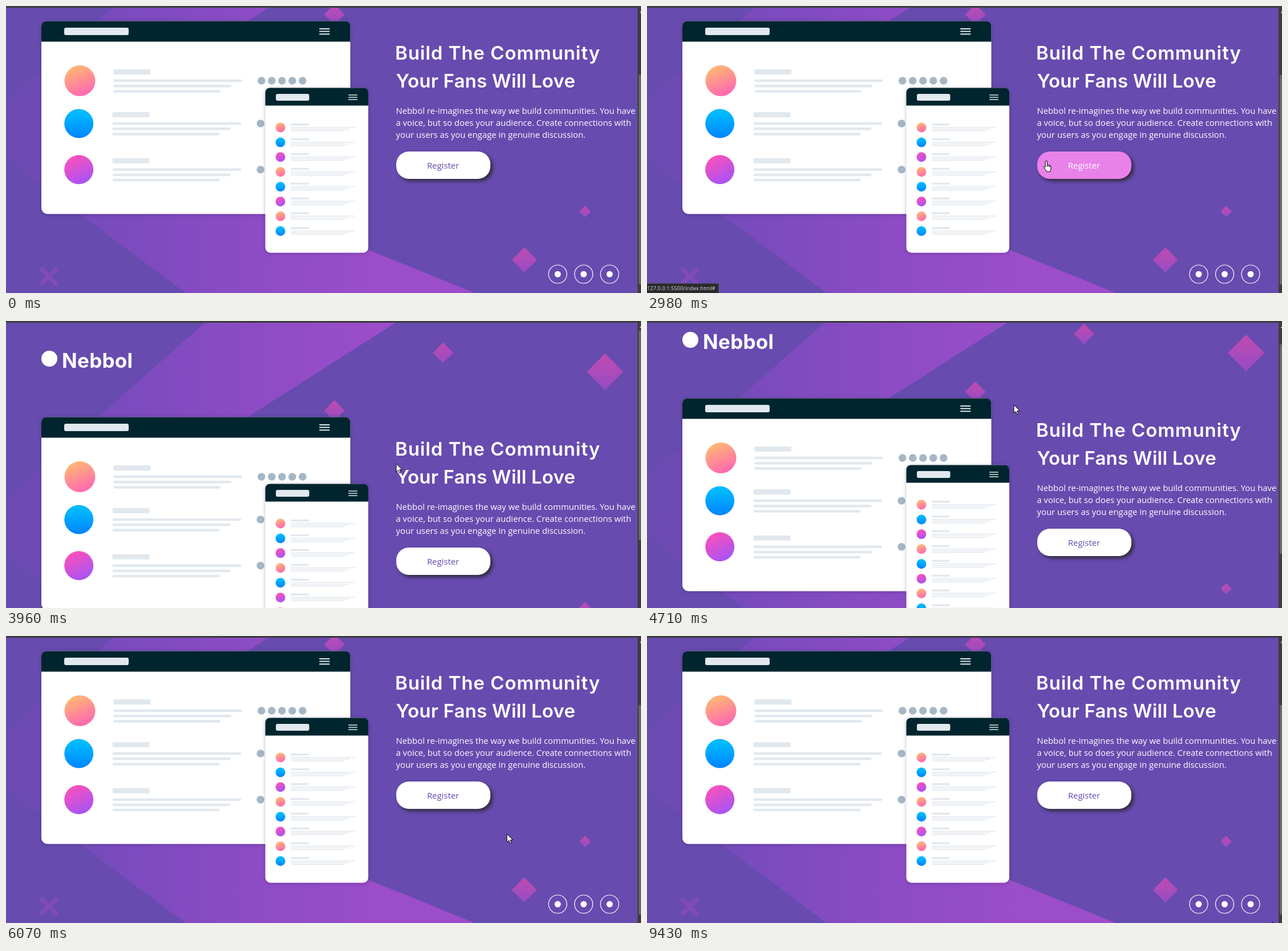
These frames come from a looping animation (1113x503 px, 9560 ms). An HTML page:

```html
<!DOCTYPE html>
<html lang="en">
<head>
<meta charset="utf-8">
<title>Community landing page</title>
<style>
  html, body { margin: 0; width: 100%; height: 100%; overflow: hidden; background: #674baf; }
  #stage { position: absolute; left: 0; top: 0; width: 1113px; height: 503px; overflow: hidden; }
  svg { position: absolute; left: 0; top: 0; display: block; }
  .head { font: 600 33px Inter, sans-serif; fill: #fff; }
  .logo { font: 700 35px Inter, sans-serif; fill: #fff; }
  .body { font: 14.85px "Open Sans", sans-serif; fill: #fff; }
  .panel { filter: drop-shadow(0 1px 3px rgba(30, 15, 70, .3)); }
  #button rect { filter: drop-shadow(4px 4px 3px rgba(35, 35, 35, .8)); }
  #status {
    position: absolute; left: 0; bottom: 0; height: 17px; padding-right: 5px;
    box-sizing: border-box; border: solid #48494c; border-width: 1px 1px 0 0;
    border-radius: 0 3px 0 0; background: #292a2d; color: #dedede;
    font: 9.4px/16px "Open Sans", sans-serif; white-space: pre;
  }
</style>
</head>
<body>
<div id="stage">
  <svg width="1113" height="503" viewBox="0 0 1113 503">
    <defs>
      <linearGradient id="band" gradientUnits="userSpaceOnUse" x1="-40" y1="0" x2="640" y2="0">
        <stop stop-color="#674baf"/><stop offset=".4" stop-color="#7d4bbf"/><stop offset="1" stop-color="#9b4dca"/>
      </linearGradient>
      <linearGradient id="gem" x1="0" y1="0" x2="0" y2="1">
        <stop stop-color="#c04bb0"/><stop offset="1" stop-color="#974cc4"/>
      </linearGradient>
      <linearGradient id="peach" x1=".3" y1="0" x2=".7" y2="1">
        <stop offset=".1" stop-color="#ffb277"/><stop offset=".9" stop-color="#ff6cae"/>
      </linearGradient>
      <linearGradient id="sky" x1="0" y1="0" x2="0" y2="1">
        <stop offset=".15" stop-color="#00baff"/><stop offset="1" stop-color="#0084ff"/>
      </linearGradient>
      <linearGradient id="plum" x1=".25" y1="0" x2=".75" y2="1">
        <stop offset=".05" stop-color="#fb50bb"/><stop offset="1" stop-color="#a254f8"/>
      </linearGradient>
    </defs>

    <rect width="1113" height="503" fill="#674baf"/>
    <g id="page">
      <path fill="url(#band)" d="M361-150H700L122 219 839 510H324L-61 222Z"/>
      <path d="M63 462 87 486M87 462 63 486" stroke="#804bb9" stroke-width="8" stroke-linecap="round"/>
      <g id="gems" fill="url(#gem)"></g>
      <circle cx="76" cy="-76" r="14" fill="#fff"/>
      <text class="logo" x="98" y="-60" letter-spacing=".3">Nebbol</text>
      <g id="desktop" class="panel"></g>
      <g id="phone" class="panel"></g>
      <text class="head" x="682" y="93.5" letter-spacing=".9">Build The Community</text>
      <text class="head" x="683.5" y="143" letter-spacing=".2">Your Fans Will Love</text>
      <g class="body">
        <text x="683.5" y="188.5">Nebbol re-imagines the way we build communities. You have</text>
        <text x="683.5" y="210">a voice, but so does your audience. Create connections with</text>
        <text x="683.5" y="231.3">your users as you engage in genuine discussion.</text>
      </g>
      <g id="button">
        <rect x="684" y="255" width="165" height="48" rx="22" fill="#fff"/>
        <text class="body" x="766" y="284.6" text-anchor="middle">Register</text>
      </g>
      <g id="social"></g>
    </g>

    <rect width="1113" height="3" fill="#3c3c3e"/>
    <rect x="1107" y="3" width="6" height="500" fill="#3d3d3f"/>
    <path d="M1110.5 12 1113 9V12Z" fill="#c8c8c8"/>
    <rect id="thumb" x="1109" y="121" width="4" height="367" fill="#686868"/>
  </svg>
  <div id="status"></div>
  <svg width="1113" height="503" viewBox="0 0 1113 503">
    <g id="pointer" fill="#fff" stroke="#000" stroke-linejoin="round">
      <path id="arrow" d="M0 0V14.5L3.4 11.4 5.8 16.8 8 15.8 5.7 10.6H10.3Z"/>
      <path id="hand" d="M-1.6 1.2A1.6 1.6 0 0 1 1.6 1.2V6.6L6.6 7.8Q8.5 8.4 8.5 10.4L7.8 15 6.8 18.5H.4L-1 15.4-4.2 11.2Q-4.8 9.4-3 9.4L-1.6 10.6ZM1.6 6.6V10M4.2 7.4V10.4M6.6 7.8V10.8"/>
    </g>
  </svg>
</div>

<script>
const $ = id => document.getElementById(id);
const LOOP = 9560;
const INK = "#00252e", PALE = "#e1e8ee", DOT = "#a5b7c6";
const TINTS = ["peach", "sky", "plum"];

// Shape helpers that return SVG markup
const box = (x, y, w, h, fill, r = 0) =>
  `<rect x="${x}" y="${y}" width="${w}" height="${h}" rx="${r}" fill="${fill}"/>`;
const disc = (x, y, r, fill) => `<circle cx="${x}" cy="${y}" r="${r}" fill="${fill}"/>`;
const gem = (x, y, r) => `<path d="M${x} ${y - r}l${r} ${r} ${-r} ${r} ${-r} ${-r}z"/>`;
const rules = (x, y, step, h, widths) =>
  widths.map((w, i) => box(x, y + i * step - h / 2, w, h, PALE, h / 2)).join("");

function panel(x, y, w, h, r, bar) {
  return box(x, y, w, h, "#fff", r) +
    `<path fill="${INK}" d="M${x} ${y + bar}V${y + r}q0 ${-r} ${r} ${-r}H${x + w - r}q${r} 0 ${r} ${r}V${y + bar}Z"/>`;
}

function desktop() {
  let out = panel(62, 26.5, 541.5, 338, 11, 36) +
    box(102, 38, 113, 13, PALE, 3) + rules(549, 40, 4.6, 2, [18.5, 18.5, 18.5]);
  [131, 206, 286.7].forEach((y, i) => {
    const dx = i ? -1.7 : 0;
    out += disc(i ? 127.7 : 129.5, y, i ? 25.5 : 27, `url(#${TINTS[i]})`) +
      box(188.3 + dx, y - 20, 65, 9, PALE, 2) +
      rules(188.3 + dx, y, 9.2, 4.5, [225.5, 207, 188]);
    for (let k = 0; k < 5; k++) out += disc(447.8 + dx + k * 18, y, 6.8, DOT);
  });
  return out;
}

function phone() {
  let out = panel(454.5, 143.5, 180.5, 289, 9, 31) +
    box(473, 154, 58.5, 12, PALE, 3) + rules(600, 156, 4, 1.7, [16, 16, 16]);
  for (let i = 0; i < 8; i++) {
    const y = 213 + i * 25.93;
    out += disc(481, y, 8.5, `url(#${TINTS[i % 3]})`) +
      box(499, y - 7, 32, 3.4, PALE, 1) +
      rules(499, y - .3, 3, 1.5, [112.5, 103.5, 94]);
  }
  return out;
}

$("gems").innerHTML = gem(575.5, 15, 18) + gem(766, -86.3, 18) + gem(1050, -53, 32) +
  gem(1015, 360.3, 10) + gem(908.5, 445, 22);
$("desktop").innerHTML = desktop();
$("phone").innerHTML = phone();
$("social").innerHTML = [967, 1012.5, 1058].map(x =>
  `<g fill="currentColor"><circle cx="${x}" cy="470" r="16" fill="none" stroke="currentColor" stroke-width="1.2"/>` +
  `<circle cx="${x}" cy="470" r="5.5"/></g>`).join("");

// time, scroll offset
const SCROLL = [[3060, 0], [3330, 102], [3480, 142], [4580, 142], [4710, 109.5], [4850, 40], [4990, 0]];

// time, x, y
const PATH = [
  [0, 1070, 515], [180, 1070, 515], [260, 1068, 496], [400, 1062, 480], [730, 1058, 476],
  [1020, 1058, 476], [1300, 1014, 476], [1480, 1012, 476], [1700, 978, 474], [1960, 975, 474],
  [2030, 974, 472], [2330, 850, 380], [2600, 740, 290], [2980, 700, 272], [3120, 684, 250],
  [4090, 684, 250], [4400, 643, 147], [4710, 643, 147], [5060, 663, 158], [5560, 815, 302],
  [5930, 878, 347], [6070, 878, 347], [6200, 885, 333], [6700, 968, 470], [7020, 970, 474],
  [7090, 970, 474], [7300, 1012, 476], [7450, 1012, 476], [7700, 1054, 478], [8060, 1052, 478],
  [8350, 1075, 465], [8600, 1090, 442], [8950, 1096, 515], [9420, 1096, 515], [9430, 1096, 501]
];

// item (0-2 social, 3 button), from, to
const HOVER = [
  [2, 330, 1130], [1, 1210, 1560], [0, 1680, 2060], [3, 2540, 3070],
  [3, 5400, 5565], [0, 6650, 7150], [1, 7210, 7500], [2, 7620, 8180]
];

const FB = "https://www.facebook.com/profile.php?id=100005327918046";
const TW = "https://twitter.com/rulan_mostevo";
const IG = "https://www.instagram.com/rulan_mostevo";
// from, to, text
const STATUS = [
  [400, 1250, IG], [1250, 1680, TW], [1680, 2540, FB], [2540, 3700, "127.0.0.1:5500/index.html#"],
  [6750, 7270, FB], [7270, 7660, TW], [7660, 8700, IG]
];

const WHITE = [255, 255, 255], PINK = [232, 130, 232], VIOLET = [103, 75, 175];
const mix = (a, b, p) => `rgb(${a.map((v, i) => Math.round(v + (b[i] - v) * p))})`;

// Linear value of column c at time t
function at(keys, t, c) {
  const i = keys.findIndex(k => k[0] > t);
  if (i < 0) return keys[keys.length - 1][c];
  if (i === 0) return keys[0][c];
  const a = keys[i - 1], b = keys[i];
  return a[c] + (b[c] - a[c]) * (t - a[0]) / (b[0] - a[0]);
}

// Hover colour fades in and out over 250 ms
function glow(item, t) {
  const FADE = 250;
  return Math.max(0, ...HOVER.filter(h => h[0] === item).map(([, from, to]) => {
    const peak = Math.min(1, (to - from) / FADE);
    return t < to ? (t - from) / FADE > 1 ? 1 : (t - from) / FADE : peak - (t - to) / FADE;
  }));
}

const icons = [...$("social").children];
const [face, label] = $("button").children;

function draw(t) {
  const shift = at(SCROLL, t, 1);
  $("page").setAttribute("transform", `translate(0 ${shift})`);
  $("thumb").setAttribute("y", 121 - shift * .733);

  icons.forEach((icon, i) => icon.style.color = mix(WHITE, PINK, glow(i, t)));
  const lit = glow(3, t);
  face.style.fill = mix(WHITE, PINK, lit);
  label.style.fill = mix(VIOLET, WHITE, lit);

  const link = HOVER.some(([, from, to]) => t >= from && t < to);
  $("hand").style.display = link ? "" : "none";
  $("arrow").style.display = link ? "none" : "";
  $("pointer").setAttribute("transform", `translate(${at(PATH, t, 1)} ${at(PATH, t, 2)})`);

  const note = STATUS.find(([from, to]) => t >= from && t < to);
  $("status").style.display = note ? "" : "none";
  $("status").textContent = note ? note[2] : "";
}

const start = performance.now();
function tick() {
  draw((performance.now() - start) % LOOP);
  requestAnimationFrame(tick);
}
tick();
</script>
</body>
</html>
```
